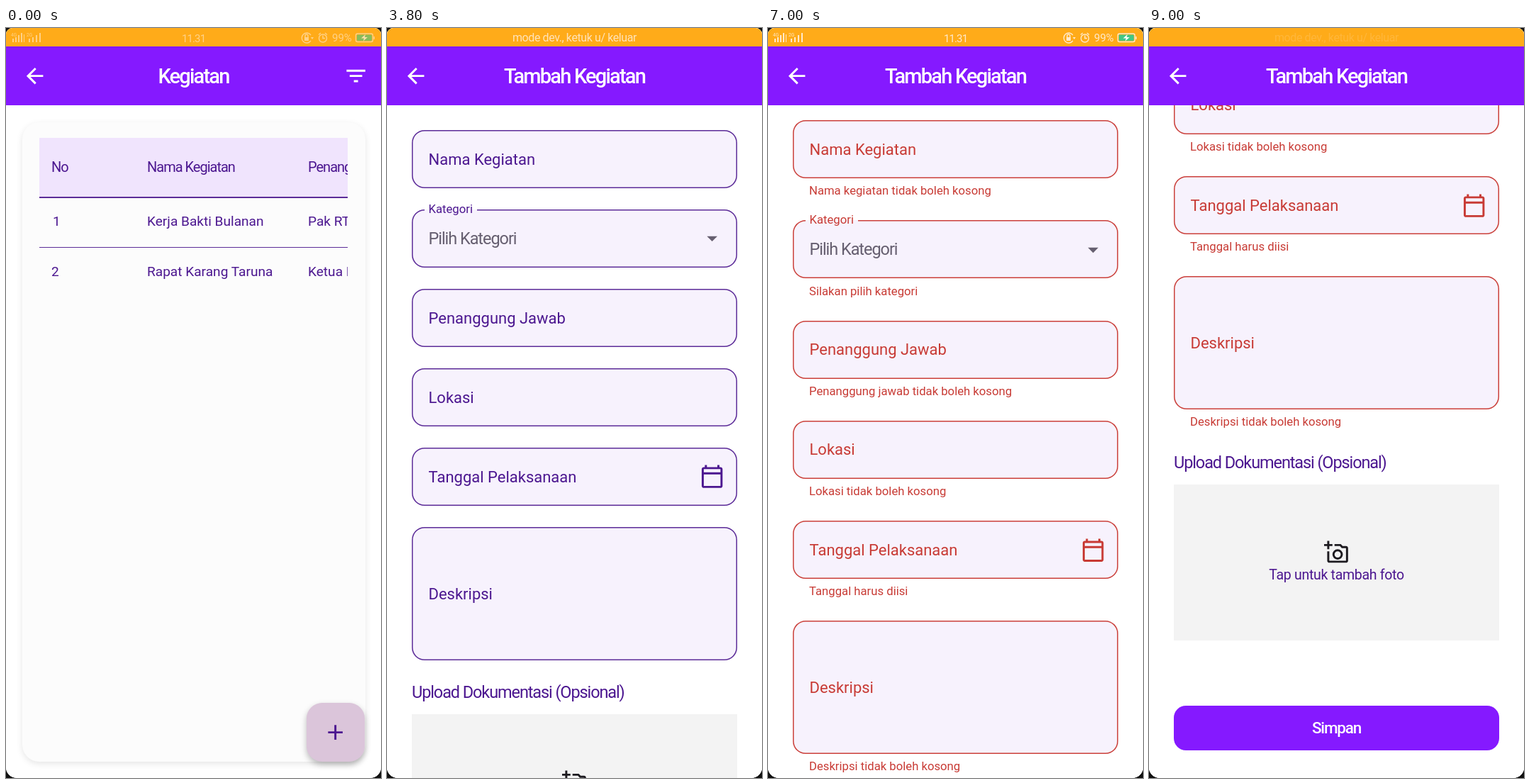
Animation, 529 px wide and 1058 px high, one loop 9.05 s. Source, as an HTML page:

```html
<!DOCTYPE html>
<html lang="id">
<head>
<meta charset="utf-8">
<title>Kegiatan</title>
<style>
:root { --violet: #8519ff; --ink: #4c1790; --line: #5c2c98; --fill: #f7f2fd; }
* { box-sizing: border-box; }
html, body { margin: 0; width: 100%; height: 100%; overflow: hidden; background: #111; }
body { font: 22px Roboto, sans-serif; color: var(--ink); white-space: nowrap; }
svg { fill: currentColor; display: block; }
#phone { position: relative; width: 529px; height: 1058px; overflow: hidden; border-radius: 9px 9px 15px 15px; background: #fff; }
#phone div, #phone b, .page > svg, .box svg, #bar svg { position: absolute; }

#bar { left: 0; top: 0; width: 529px; height: 26px; background: #ffab19; color: #ffe9cb; z-index: 3; }
#dev { width: 100%; text-align: center; font-size: 16px; line-height: 28px; letter-spacing: -.4px; }
#icons { left: 0; top: 0; font-size: 15px; }

.page { inset: 0; background: #fff; }
.head { left: 0; top: 26px; width: 529px; height: 83px; background: var(--violet); color: #fff;
  font-size: 29px; font-weight: 500; line-height: 84px; letter-spacing: -1.8px; text-align: center; }
.page > svg { color: #fff; top: 50px; }

.card { left: 23px; top: 133px; width: 484px; height: 902px; border-radius: 24px; background: #fcfcfc; box-shadow: 0 3px 10px #0000001a; }
.table { left: 47px; top: 155px; width: 435px; height: 230px; overflow: hidden; font-size: 19.1px; }
.row { left: 0; width: 100%; }
.row div:nth-child(1) { left: 17px; }
.row div:nth-child(2) { left: 152px; }
.row div:nth-child(3) { left: 379px; }
.row.top { background: #f0e4fd; font-size: 20px; letter-spacing: -1px; }
.fab { left: 424px; top: 952px; width: 82px; height: 83px; border-radius: 22px; background: #dbc5da; box-shadow: 0 4px 8px #0004; }
.fab svg { margin: 24px 23px; }

#scroll { left: 35px; top: 144px; width: 459px; }
#phone .field { position: relative; height: 112px; }
.box { width: 459px; height: 82px; box-shadow: inset 0 0 0 1.5px var(--line); border-radius: 18px; background: var(--fill);
  padding-left: 23.5px; display: flex; align-items: center; }
#phone .field.tall { height: 217px; }
.tall .box { height: 188px; }
.box svg { right: 17.5px; }
#phone .box b { left: 17.5px; top: -12px; padding: 0 6px; font: 16.7px/24px Roboto, sans-serif; background: linear-gradient(#fff 50%, var(--fill) 50%); }
.hint { font-size: 23.5px; letter-spacing: -1.05px; color: #665f70; }
.note { display: none; left: 23px; bottom: 31px; font-size: 16.7px; line-height: 20px; }
.err .note { display: block; }
#phone .err .field { height: 141.3px; }
#phone .err .field.tall { height: 246.3px; }
.err .field { color: #c83b35; --line: #cb403a; }
.upload { font-size: 23.5px; line-height: 32px; letter-spacing: -1.1px; }
.photo { top: 47px; width: 459px; height: 220px; background: #f3f3f3; font-size: 19.5px; line-height: 29px; letter-spacing: -.3px;
  display: flex; flex-direction: column; align-items: center; justify-content: center; }
.photo svg { color: #1d1b20; }
.save { top: 359px; width: 459px; height: 63px; border-radius: 17px; background: var(--violet); color: #fff;
  font-size: 22.5px; font-weight: 500; line-height: 63px; letter-spacing: -1.2px; text-align: center; }
#foot { width: 459px; }
</style>
</head>
<body>
<div id="phone">
  <div class="page" id="list"></div>
  <div class="page" id="form"></div>
  <div id="bar">
    <div id="dev">mode dev., ketuk u/ keluar</div>
    <svg id="icons" width="529" height="27">
      <g font-size="6.5"><text x="7" y="12">4G</text><text x="29" y="12">2G</text></g>
      <path d="M9 15h2v5h-2zM13 13h2v7h-2zM17 10h2v10h-2zM21 7h2v13h-2zM25 9h1v11h-1zM32 15h2v5h-2zM37 13h2v7h-2zM42 10h2v10h-2zM47 7h2v13h-2z"/>
      <text x="248" y="19.5" letter-spacing="-.9">11.31</text>
      <text x="460" y="19">99%</text>
      <g fill="none" stroke="currentColor" stroke-width="1.4">
        <path d="M430 10a7 7 0 1 0 0 8M422 13v-2a2 2 0 0 1 4 0v2M447 10.500v4h3M441 9.500l3-2.500M453 9.500l-3-2.500"/>
        <circle cx="447" cy="14.500" r="5.500"/>
        <rect x="493.500" y="8" width="24" height="11.500" rx="2.500"/>
      </g>
      <path d="M421 13h6v5h-6zM430 13h4l-2 3zM518.500 12h1.500v4h-1.500z"/>
      <rect x="495" y="9.500" width="21" height="8.500" rx="1" fill="#43c784"/>
      <path d="M507 9l-6 5.500h4l-1 4 6-5.500h-4z" fill="#fff"/>
    </svg>
  </div>
</div>
<script>
const $ = id => document.getElementById(id);
const paths = {
  back: "M20 11H7.83l5.59-5.59L12 4l-8 8 8 8 1.41-1.41L7.83 13H20z",
  filter: "M10 18h4v-2h-4zM3 6v2h18V6zm3 7h12v-2H6z",
  add: "M19 13h-6v6h-2v-6H5v-2h6V5h2v6h6z",
  drop: "M7 10l5 5 5-5z",
  date: "M20 3h-1V1h-2v2H7V1H5v2H4c-1.1 0-2 .9-2 2v16c0 1.1.9 2 2 2h16c1.1 0 2-.9 2-2V5c0-1.1-.9-2-2-2zm0 18H4V10h16zm0-13H4V5h16z",
  photo: "M21 6h-3.17L16 4h-6v2h5.12l1.83 2H21v12H5v-9H3v9c0 1.1.9 2 2 2h16c1.1 0 2-.9 2-2V8c0-1.1-.9-2-2-2zM8 14a5 5 0 0 0 10 0a5 5 0 0 0-10 0zm5-3a3 3 0 0 1 0 6a3 3 0 0 1 0-6zM5 6h3V4H5V1H3v3H0v2h3v3h2z"
};
const icon = (name, style = "") =>
  `<svg viewBox="0 0 24 24" width="35.3" height="35.3" style="${style}"><path d="${paths[name]}"/></svg>`;
const head = title => `<div class="head">${title}</div>${icon("back", "left:23.4px")}`;
const row = (top, height, cells, kind = "") =>
  `<div class="row ${kind}" style="top:${top}px;height:${height}px;line-height:${height}px">` +
  cells.map(c => `<div>${c}</div>`).join("") + "</div>";
const rule = y => `<div style="top:${y}px;width:435px;height:1.5px;background:var(--line)"></div>`;
const field = (inner, note, kind = "") =>
  `<div class="field ${kind}"><div class="box">${inner}</div><div class="note">${note}</div></div>`;

$("list").innerHTML = head("Kegiatan") + icon("filter", "left:476px") +
  '<div class="card"></div><div class="table">' +
  row(0, 83, ["No", "Nama Kegiatan", "Penanggung Jawab"], "top") +
  row(83, 70, ["&hairsp;1", "Kerja Bakti Bulanan", "Pak RT"]) +
  row(154, 70, ["2", "Rapat Karang Taruna", "Ketua Karang Taruna"]) +
  rule(83) + rule(153.5) + `</div><div class="fab">${icon("add")}</div>`;

$("form").innerHTML = '<div id="scroll">' +
  field("Nama Kegiatan", "Nama kegiatan tidak boleh kosong") +
  field(`<b>Kategori</b><span class="hint">Pilih Kategori</span>${icon("drop", "color:#665f70")}`, "Silakan pilih kategori") +
  field("Penanggung Jawab", "Penanggung jawab tidak boleh kosong") +
  field("Lokasi", "Lokasi tidak boleh kosong") +
  field("Tanggal Pelaksanaan" + icon("date"), "Tanggal harus diisi") +
  field("Deskripsi", "Deskripsi tidak boleh kosong", "tall") +
  `<div id="foot"><div class="upload">Upload Dokumentasi (Opsional)</div>
   <div class="photo">${icon("photo")}Tap untuk tambah foto</div><div class="save">Simpan</div></div></div>` +
  head("Tambah Kegiatan");

const LOOP = 9050, OPEN = 1000, SUBMIT = 5600;
// Drags: start, end, scroll offset reached
const drags = [[1600, 2350, 324], [2900, 3550, 0], [4050, 4700, 324], [6250, 7130, 0], [7300, 7920, 500]];
const ramp = (t, a, b) => Math.min(1, Math.max(0, (t - a) / (b - a)));
const ease = p => p < .5 ? 2 * p * p : 1 - 2 * (1 - p) ** 2;

function scrollAt(t) {
  let y = 0;
  for (const [a, b, to] of drags) y += (to - y) * ease(ramp(t, a, b));
  return y;
}

function draw(now) {
  const t = now % LOOP, phase = (t + 100) % 6000;
  const open = ramp(t, OPEN, OPEN + 300);
  $("form").style.opacity = ramp(open, 0, .6);
  $("form").style.transform = `scale(${.88 + .12 * (1 - (1 - open) ** 3)})`;
  $("scroll").style.transform = `translateY(${-scrollAt(t)}px)`;
  $("scroll").classList.toggle("err", t >= SUBMIT);
  // Status icons and the notice take turns, with a blank pause between them
  $("icons").style.opacity = ramp(phase, 20, 150) * ramp(phase, 2500, 2250);
  $("dev").style.opacity = .9 * ramp(phase, 3060, 3260) * ramp(phase, 5600, 5350);
}

const start = performance.now();
function tick() {
  draw(performance.now() - start);
  requestAnimationFrame(tick);
}
tick();
</script>
</body>
</html>
```
